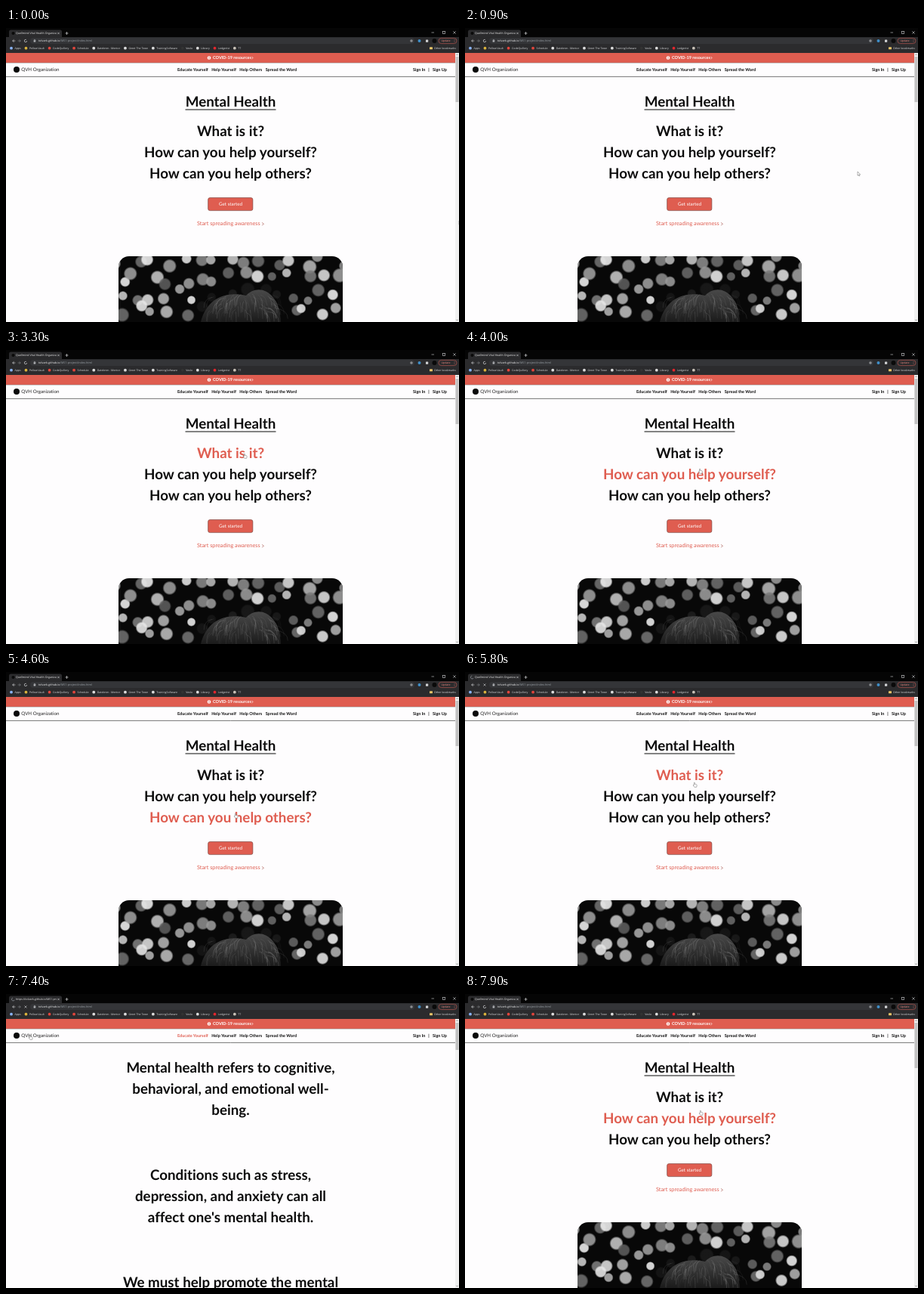
An HTML page with a canvas that plays this animation: 600 px wide and 389 px high, repeating every 8000 ms.

```html
<!DOCTYPE html>
<html lang="en">
<head>
<meta charset="utf-8">
<title>Mental health site walkthrough</title>
<style>
html, body { margin: 0; width: 100%; height: 100%; overflow: hidden; background: #fefdfe; }
canvas { display: block; }
</style>
</head>
<body>
<canvas id="stage" width="600" height="389"></canvas>
<script>
const ctx = document.getElementById('stage').getContext('2d');
ctx.textRendering = 'geometricPrecision';
ctx.letterSpacing = '0.005px'; // keeps letters separate instead of ligatures

const LOOP = 8000, MIDDLE = 297.5, ROW = 28;
const RED = '#df5d50', INK = '#0b0b0b', BAR = '#2b2b2d', ICON = '#d2d3d5';
const LATO = 'Lato, sans-serif', UI = '"Open Sans", sans-serif';

const questions = ['What is it?', 'How can you help yourself?', 'How can you help others?']
  .map((text, i) => ({ text, y: 143 + i * ROW }));

const paragraphs = [
  ['Mental health refers to cognitive,', 'behavioral, and emotional well-', 'being.'],
  ['Conditions such as stress,', 'depression, and anxiety can all', "affect one's mental health."],
  ['We must help promote the mental']
];

const bookmarks = [
  ['Apps', '#8ab4f8'], ['Pellow Vault', '#d9b23c'], ['CodeQuillery', '#e2453c'],
  ['Schedule', '#e2453c'], ['Datebren - Mentor', '#ddd'], ['Greet The Town', '#ddd'],
  ['TrainingSoftware', '#ddd'], ['Vexlo', '#333'], ['Library', '#ddd'],
  ['Ledgerist', '#e3262e'], ['TT', '#c9c2b8']
];

// Pointer moves: start, end, destination, sideways bow on the way
const moves = [
  { start: 0, end: 900, x: 520, y: 190 },
  { start: 1100, end: 2000, x: 335, y: 323 },
  { start: 2000, end: 2900, x: 378, y: 131, bow: 215 },
  { start: 2900, end: 3300, x: 314, y: 137 },
  { start: 3600, end: 4600, x: 302, y: 187 },
  { start: 4600, end: 4800, x: 302, y: 183 },
  { start: 5000, end: 5400, x: 302, y: 146 },
  { start: 6200, end: 6800, x: 30, y: 54 },
  { start: 7400, end: 7900, x: 310, y: 154 }
];

const arrow = new Path2D('M0 0V5.3L1.2 4.2L2 6L2.8 5.6L2 4H3.7Z');
const hand = new Path2D('M1.3.5Q1.9-.2 2.4.5V2.4L4.6 2.9Q5.3 3.2 5.2 4L4.7 6.3H1.9L0 3.9Q.2 3.2 1.3 3.9Z');

function pointerAt(t) {
  let x = 600, y = 255;
  for (const { start, end, x: toX, y: toY, bow = 0 } of moves) {
    const k = Math.min(1, Math.max(0, (t - start) / (end - start)));
    x += (toX - x) * k + bow * Math.sin(Math.PI * k);
    y += (toY - y) * k;
  }
  return [x, y];
}

function seeded(seed) {
  return () => (seed = (seed * 16807) % 2147483647) / 2147483647;
}

function rect(x, y, w, h, fill, radius = 0) {
  ctx.fillStyle = fill;
  ctx.beginPath();
  ctx.roundRect(x, y, w, h, radius);
  ctx.fill();
}

function disc(x, y, r, fill) {
  ctx.fillStyle = fill;
  ctx.beginPath();
  ctx.arc(x, y, r, 0, 7);
  ctx.fill();
}

function ring(x, y, r, from, to, color) {
  ctx.strokeStyle = color;
  ctx.lineWidth = 0.7;
  ctx.beginPath();
  ctx.arc(x, y, r, from, to);
  ctx.stroke();
}

function line(color, width, ...points) {
  ctx.strokeStyle = color;
  ctx.lineWidth = width;
  ctx.beginPath();
  for (let i = 0; i < points.length; i += 2) ctx.lineTo(points[i], points[i + 1]);
  ctx.stroke();
}

// Draws text and returns the x where it ends
function label(text, x, y, size, color, weight = 400, align = 'left', family = LATO) {
  ctx.font = `${weight} ${size}px ${family}`;
  ctx.textAlign = align;
  ctx.fillStyle = color;
  ctx.fillText(text, x, y);
  return x + ctx.measureText(text).width;
}

const uiLabel = (text, x, y, color = '#dfe0e2', size = 3.5) =>
  label(text, x, y, size, color, 400, 'left', UI);
const navLabel = (text, x, color = INK) => label(text, x, 56.8, 5.5, color, 700);
const heading = (text, y, color = INK) => label(text, MIDDLE, y, 18.75, color, 700, 'center');
const chevron = (x, y, s, color) => line(color, 0.8, x, y - s, x + s, y, x, y + s);

function cross(x, y, s) {
  line(ICON, 0.6, x - s, y - s, x + s, y + s);
  line(ICON, 0.6, x - s, y + s, x + s, y - s);
}

function navArrow(x, dir, color) {
  line(color, 0.7, x, 15.3, x + 1.8 * dir, 17, x, 18.7);
  line(color, 0.7, x - 1.8 * dir, 17, x + 1.8 * dir, 17);
}

function drawTabs(t, loading, title) {
  rect(0, 0, 600, 12, '#050505');
  rect(4, 2.5, 70, 10, BAR, [2.5, 2.5, 0, 0]);
  if (loading) ring(9.5, 7, 2, t / 130, t / 130 + 4, '#9aa0a6');
  else disc(9.5, 7, 2, '#0a0a0a');
  ctx.save();
  ctx.beginPath();
  ctx.rect(13, 2, 54, 10);
  ctx.clip();
  uiLabel(title, 13, 8.3, '#eee', 3.6);
  ctx.restore();
  cross(69.5, 7, 1.2);
  line(ICON, 0.7, 78.5, 7, 82.5, 7);
  line(ICON, 0.7, 80.5, 5, 80.5, 9);
  line(ICON, 0.6, 563.5, 6, 567, 6);
  ctx.strokeRect(578.5, 4.3, 3.2, 3.2);
  cross(594, 6, 1.7);
}

function drawToolbar(loading) {
  rect(0, 12, 600, 21, BAR);
  navArrow(10.5, -1, ICON);
  navArrow(17.5, 1, '#7d7f83');
  if (loading) cross(26, 17, 1.5);
  else ring(26, 17, 1.7, 0, 5.3, ICON);
  rect(32, 13, 509, 8, '#343538', 4);
  rect(36.6, 16.3, 2.6, 2.2, '#b5b7ba');
  ring(37.9, 16.2, 0.9, Math.PI, 7, '#b5b7ba');
  const hostEnd = uiLabel('tolvark.github.io', 43, 18.4, '#f2f2f3', 3.75);
  uiLabel('/MS1-project/index.html', hostEnd, 18.4, '#9aa0a6', 3.75);
  disc(537, 17, 1.8, '#8b8d90');
  disc(547.5, 17, 2, '#3f8fc9');
  rect(556, 15.6, 3.2, 3.2, ICON, 0.6);
  disc(567.5, 17, 3, '#0a0a0a');
  ctx.strokeStyle = '#c65c55';
  ctx.lineWidth = 0.6;
  ctx.beginPath();
  ctx.roundRect(573, 13.4, 24, 7.2, 3.6);
  ctx.stroke();
  uiLabel('Update', 576.5, 18.3, '#ee8a82');
  for (let i = -1; i < 2; i++) disc(594, 17 + i * 1.4, 0.4, '#ee8a82');

  let x = 7;
  for (const [text, color] of bookmarks) {
    disc(x, 26.7, 1.9, color);
    x = uiLabel(text, x + 4.5, 28.1) + 6.8;
  }
  rect(561, 25.3, 4, 3, '#e8c468', 0.5);
  uiLabel('Other bookmarks', 567, 28.1);
}

function drawScrollbar(thumb) {
  rect(595, 33, 5, 356, '#f1f1f1');
  rect(595.5, 38, 4, thumb, '#c1c1c1');
  line('#666', 0.7, 596.3, 36, 597.5, 34.8, 598.7, 36);
  line('#666', 0.7, 596.3, 385.8, 597.5, 387, 598.7, 385.8);
}

function drawHeader(onArticle) {
  rect(0, 33, 595, 13, RED);
  disc(269, 39.5, 2.3, '#fff');
  line(RED, 0.8, 269, 38, 269, 41);
  label('COVID-19 resources', 274, 41.4, 5.5, '#fff', 700);
  chevron(325.7, 39.5, 1.4, '#fff');
  line('#777', 0.5, 0, 46.2, 595, 46.2);
  line('#555', 0.8, 0, 64.4, 595, 64.4);
  disc(14, 55, 4, '#0a0a0a');
  label('QVH Organization', 20.3, 56.8, 6.2, '#222');
  let x = 227;
  for (const text of ['Educate Yourself', 'Help Yourself', 'Help Others', 'Spread the Word']) {
    x = navLabel(text, x, onArticle && x === 227 ? RED : INK) + 4.4;
  }
  navLabel('Sign In', 539);
  navLabel('|', 559.3);
  navLabel('Sign Up', 565);
}

function drawPhoto() {
  const random = seeded(4711);
  ctx.save();
  ctx.beginPath();
  ctx.roundRect(149, 302, 297, 120, 14);
  ctx.clip();
  ctx.fillStyle = '#080808';
  ctx.fillRect(149, 302, 297, 87);

  // Soft round lights on a loose grid, dimmer behind the head
  for (let i = 0; i < 60; i++) {
    const x = 152 + (i % 15) * 20.5 + (random() - 0.5) * 18;
    const y = 309 + Math.floor(i / 15) * 22 + (random() - 0.5) * 16;
    const r = 6 + random() * 4;
    const tone = 90 + 150 * random();
    const behindHead = Math.hypot((x - 310) / 65, (y - 389) / 55) < 1;
    const glow = ctx.createRadialGradient(x, y, r * 0.75, x, y, r);
    glow.addColorStop(0, `rgba(${tone},${tone},${tone},${behindHead ? 0.1 : 0.9})`);
    glow.addColorStop(1, `rgba(${tone},${tone},${tone},0)`);
    disc(x, y, r, glow);
  }

  const hair = ctx.createLinearGradient(0, 345, 0, 392);
  hair.addColorStop(0, '#4a4a4a');
  hair.addColorStop(1, '#181818');
  ctx.fillStyle = hair;
  ctx.beginPath();
  ctx.moveTo(258, 389);
  ctx.bezierCurveTo(266, 358, 290, 348, 318, 354);
  ctx.bezierCurveTo(332, 338, 362, 345, 364, 389);
  ctx.fill();
  for (let i = 0; i < 90; i++) {
    const x = 270 + random() * 88, y = 352 + random() * 25;
    const lean = (x - 312) * 0.25 + (random() - 0.5) * 14;
    ctx.strokeStyle = `rgba(190,190,190,${0.08 + random() * 0.25})`;
    ctx.lineWidth = 0.6;
    ctx.beginPath();
    ctx.moveTo(x, y);
    ctx.quadraticCurveTo(x + lean, y + 2, x + lean, y + 14);
    ctx.stroke();
  }
  ctx.restore();
}

function drawHome(hovered) {
  heading('Mental Health', 103.5);
  rect(237.5, 107.4, 120, 1, INK);
  for (const q of questions) heading(q.text, q.y, q === hovered ? RED : INK);
  rect(267.6, 224.6, 59.3, 17, RED, 2.5);
  ctx.strokeStyle = '#6d403c';
  ctx.lineWidth = 0.6;
  ctx.stroke();
  label('Get started', MIDDLE, 235.3, 6.25, '#fff', 400, 'center');
  label('Start spreading awareness', 253, 261.4, 7.3, RED);
  chevron(339.3, 259.3, 1.9, '#a8564e');
  drawPhoto();
}

function drawArticle() {
  paragraphs.forEach((rows, p) =>
    rows.forEach((row, i) => heading(row, 103.5 + p * 142 + i * ROW)));
}

function isOver(question, x, y) {
  ctx.font = `700 18.75px ${LATO}`;
  const halfWidth = ctx.measureText(question.text).width / 2;
  return Math.abs(x - MIDDLE) < halfWidth && y >= question.y - 17 && y < question.y + 7;
}

function drawPointer(x, y, shape) {
  ctx.save();
  ctx.translate(x, y);
  ctx.fillStyle = '#fff';
  ctx.fill(shape);
  ctx.strokeStyle = '#666';
  ctx.lineWidth = 0.5;
  ctx.stroke(shape);
  ctx.restore();
}

function draw(now) {
  const t = Math.floor(now % LOOP / 100) * 100;
  const onArticle = t >= 5900 && t < 7500;
  const loading = (t >= 5700 && t < 6000) || (t >= 7100 && t < 7700);
  const [x, y] = pointerAt(t);
  const hovered = !onArticle && questions.find(q => isOver(q, x, y));
  const onLogo = x < 72 && y > 48 && y < 62;

  rect(0, 0, 600, 389, '#fefdfe');
  if (onArticle) drawArticle();
  else drawHome(hovered);
  drawHeader(onArticle);
  drawScrollbar(onArticle ? 36 : 60);
  drawToolbar(loading);
  drawTabs(t, loading, loading && onArticle
    ? 'https://tolvark.github.io/MS1-project' : 'Quellmind Vital Health Organization');
  drawPointer(x, y, hovered || onLogo ? hand : arrow);
  requestAnimationFrame(draw);
}
requestAnimationFrame(draw);
</script>
</body>
</html>
```
